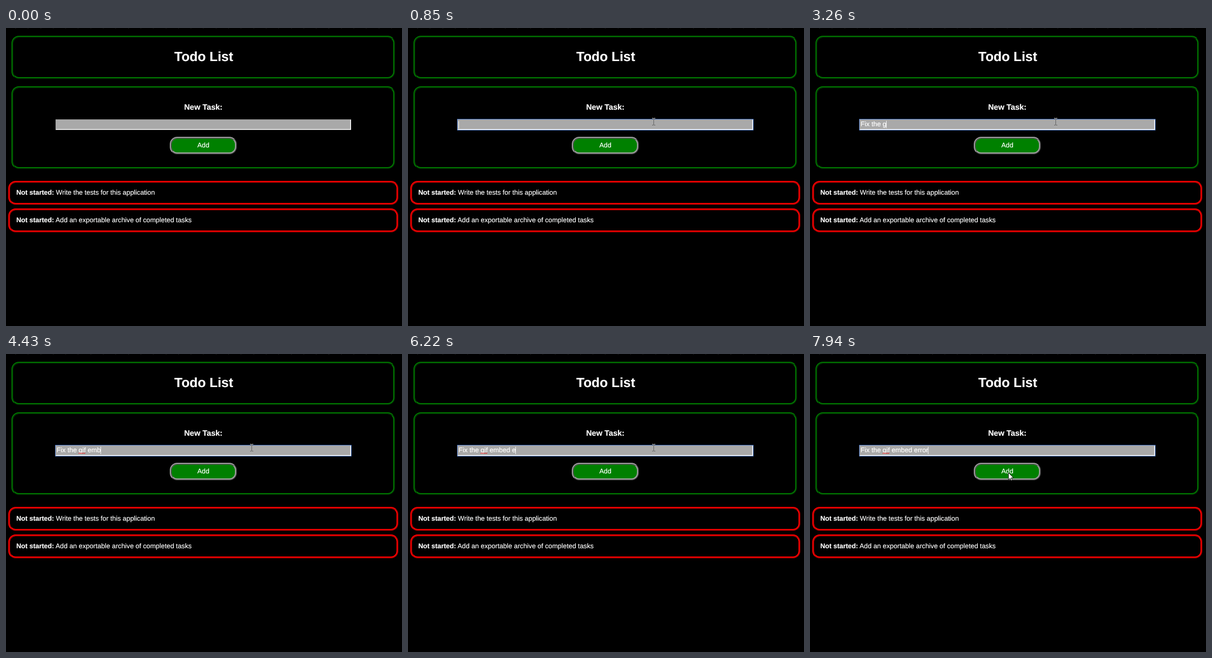
An HTML page for the animation above (8 s loop, 863 by 649 pixels).

```html
<!DOCTYPE html>
<html lang="en">
<head>
<meta charset="utf-8">
<title>Todo List</title>
<style>
  html, body { margin: 0; width: 100%; height: 100%; overflow: hidden; background: #000; }
  #stage {
    position: relative; width: 863px; height: 649px; overflow: hidden; background: #000; color: #fff;
    font: 14.667px/16px "Liberation Sans", Arial, sans-serif;
    text-rendering: geometricPrecision; -webkit-text-stroke: .2px #fff; cursor: default;
  }
  #stage * { position: absolute; box-sizing: border-box; white-space: pre; }
  #stage b { position: static; }
  .ticks { left: 20px; top: 0; width: 843px; height: 1px;
    background: repeating-linear-gradient(90deg, #1c1c1c 0 2px, #000 2px 27.3px); }
  .panel, .task, #button { border: 4px ridge green; border-radius: 16px; }
  .panel { left: 12px; width: 836px; }
  .task { left: 5px; width: 850px; height: 52px; border-color: red; }
  .task span { left: 13.5px; top: 14px; }
  .center { left: 0; width: 860px; text-align: center; }
  h1 { top: 47px; margin: 0; padding-left: 2px; font-size: 29px; line-height: 33px; }
  h2 { top: 162px; margin: 0; font-size: 17.16px; line-height: 20px; }
  #field { left: 108px; top: 199px; width: 644px; height: 23px; background: #a9a9a9;
    border: 2px solid; border-color: #a6a6a6 #eee #eee #a6a6a6; }
  #field.focus { box-shadow: 0 0 0 1px #4377d0; }
  #typed { left: 110.3px; top: 202px; }
  #caret { width: 1px; height: 16px; background: #fff; }
  #button { left: 357px; top: 237px; width: 146px; height: 38px; background: green; border-color: #a9a9a9; }
  #add { top: 248px; }
  svg { left: 0; top: 0; overflow: visible; }
  path { fill: none; stroke: #fff; }
  #spell path { stroke: #f00; }
  #arrow path { fill: #fff; stroke: #000; }
  #beam { mix-blend-mode: difference; }
</style>
</head>
<body>
<div id="stage">
  <div class="ticks"></div>
  <div class="panel" style="top:17px;height:94px"></div>
  <h1 class="center">Todo List</h1>
  <div class="panel" style="top:127px;height:180px"></div>
  <h2 class="center">New Task:</h2>
  <div id="field"></div>
  <span id="typed"></span>
  <svg id="spell" width="863" height="649"><path d="M158 217l2-1.6 2 1.6 2-1.6 2 1.6 2-1.6 2 1.6 2-1.6 1 .8"/></svg>
  <div id="caret"></div>
  <div id="button"></div>
  <span id="add" class="center">Add</span>
  <div class="task" style="top:333px"><span><b>Not started:</b> Write the tests for this application</span></div>
  <div class="task" style="top:393px"><span><b>Not started:</b> Add an exportable archive of completed tasks</span></div>
  <svg id="beam" width="12" height="20"><path d="M-3 -7.5h3M1 -7.5h3M.5 -7V7M-3 7.5h3M1 7.5h3"/></svg>
  <svg id="arrow" width="12" height="20"><path d="M.5 .5V16l3.6-3.4L6.6 18l2.2-1L6.5 11.8H11.5Z"/></svg>
</div>
<script>
const LOOP = 8000, CLICK = 850, BLINK = 550, POINTER_STEP = 78;

// Each burst is typed at an even pace between its first and last key.
const bursts = [
  { text: "Fix ", from: 1700, to: 2160 },
  { text: "the ", from: 2330, to: 2630 },
  { text: "g", from: 2800, to: 2800 },
  { text: "if ", from: 3350, to: 3730 },
  { text: "embed ", from: 3880, to: 4890 },
  { text: "error", from: 6070, to: 6680 }
];
const keys = bursts.flatMap(({ text, from, to }) =>
  [...text].map((char, i) => ({ char, time: from + (to - from) * i / Math.max(1, text.length - 1) })));

// Pointer sweeps: start, bend and end of a quadratic curve.
const enter = { from: 220, to: 680, path: [[684, 90], [600, 140], [535, 204]], ease: u => u * (2 - u) };
const leave = { from: 7302, to: 7926, path: [[535, 204], [500, 293], [432, 258]], ease: u => u * u * (3 - 2 * u) };

const [field, typed, spell, caret, beam, arrow] =
  ["field", "typed", "spell", "caret", "beam", "arrow"].map(id => document.getElementById(id));
const show = (node, on) => { node.style.visibility = on ? "visible" : "hidden"; };
const place = (node, x, y) => { node.style.left = x + "px"; node.style.top = y + "px"; };

function pointerAt(t) {
  const { from, to, path: [a, b, c], ease } = t < leave.from ? enter : leave;
  const held = Math.floor((t - from) / POINTER_STEP) * POINTER_STEP;
  const u = ease(Math.min(1, held / (POINTER_STEP * Math.floor((to - from) / POINTER_STEP))));
  return a.map((start, i) => Math.round((1 - u) ** 2 * start + 2 * u * (1 - u) * b[i] + u * u * c[i]));
}

function renderField(t) {
  const done = keys.filter(key => key.time <= t);
  const text = done.map(key => key.char).join("");
  const lastInput = done.length ? done[done.length - 1].time : CLICK;
  typed.textContent = text;
  field.classList.toggle("focus", t >= CLICK);
  show(spell, text.includes("gif "));
  show(caret, t >= CLICK && Math.floor((t - lastInput) / BLINK) % 2 === 0);
  place(caret, Math.floor(110.3 + typed.getBoundingClientRect().width), text ? 202 : 203);
}

function renderPointer(t) {
  const visible = t >= enter.from;
  const [x, y] = pointerAt(t);
  const overField = y >= 199 && y < 222;
  show(beam, visible && overField);
  show(arrow, visible && !overField);
  place(overField ? beam : arrow, x, y);
}

function tick() {
  const t = performance.now() % LOOP;
  renderField(t);
  renderPointer(t);
  requestAnimationFrame(tick);
}
tick();
</script>
</body>
</html>
```
